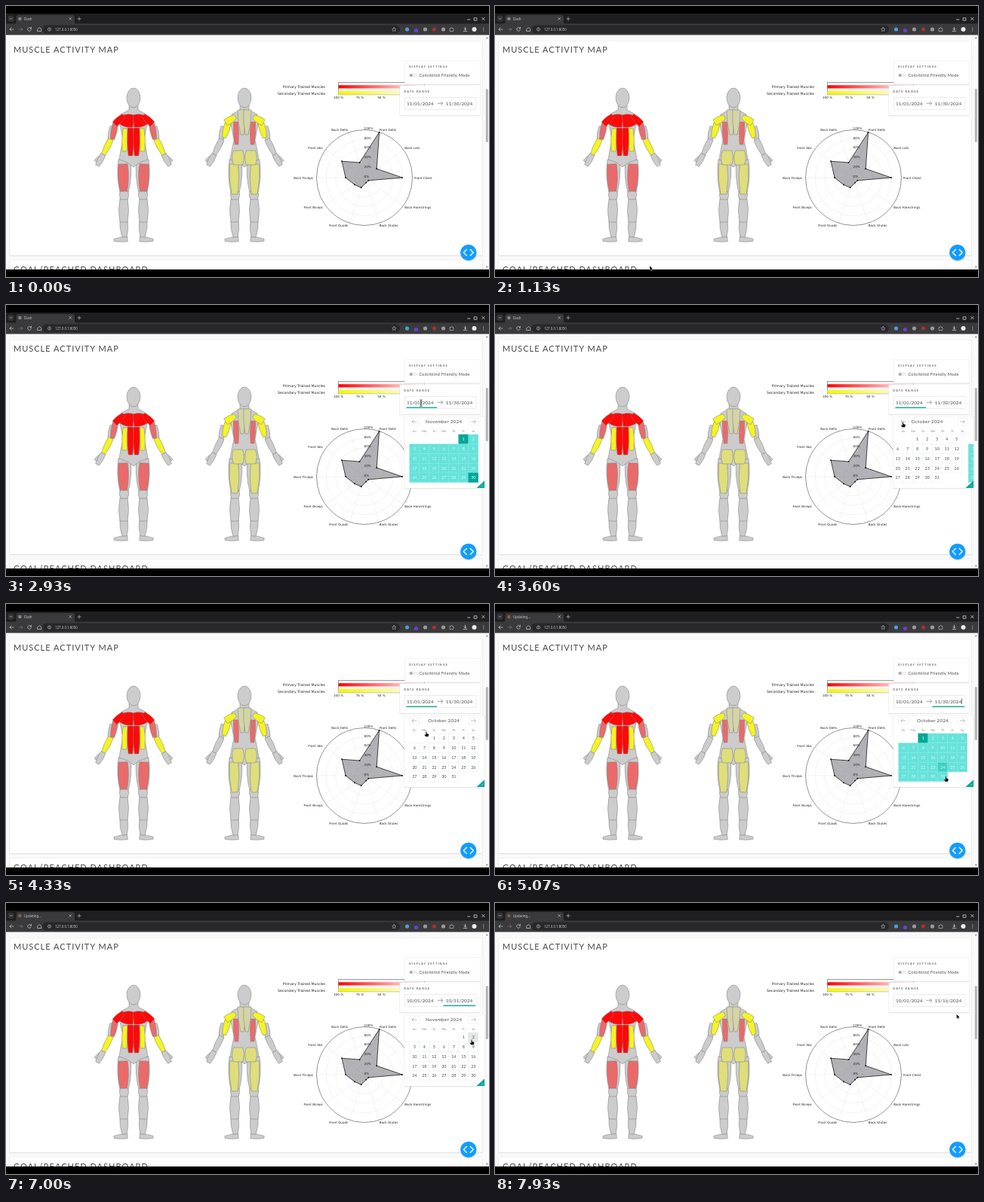
An HTML page for the animation above (8 s loop, 640x360 px).

```html
<!DOCTYPE html>
<html lang="en">
<head>
<meta charset="utf-8">
<title>Muscle Activity Map</title>
<style>
html, body { margin: 0; width: 100%; height: 100%; overflow: hidden; background: #000; }
svg { display: block; width: 100vw; height: 100vh; }
text { font-family: Lato, "Open Sans", sans-serif; fill: #484848; }
.plot { font-family: "DejaVu Sans", sans-serif; fill: #222; font-size: 4.15px; }
.legend { font-size: 4.65px; }
.chrome { font-family: "Noto Sans", sans-serif; fill: #c8c8c8; font-size: 4.4px; }
.title { font-size: 11px; letter-spacing: 1px; }
.label { font-size: 3.9px; font-weight: bold; letter-spacing: 1.08px; fill: #666; }
.date { font-size: 6.4px; }
.month { font-size: 6.2px; letter-spacing: .3px; }
.day { font-size: 5.4px; }
.week { font-size: 4px; fill: #888; }
.mid { text-anchor: middle; }
.end { text-anchor: end; }
.line { fill: none; stroke-linecap: round; stroke-linejoin: round; }
</style>
</head>
<body>
<svg id="stage" viewBox="0 0 640 360"></svg>
<script>
const NS = 'http://www.w3.org/2000/svg';
const LOOP = 8000;
const stage = document.getElementById('stage');

function add(parent, tag, attrs = {}, text) {
  const el = document.createElementNS(NS, tag);
  for (const k in attrs) el.setAttribute(k, attrs[k]);
  if (text !== undefined) el.textContent = text;
  parent.appendChild(el);
  return el;
}
const rect = (p, x, y, width, height, fill, more = {}) => add(p, 'rect', { x, y, width, height, fill, ...more });
const circle = (p, cx, cy, r, fill, more = {}) => add(p, 'circle', { cx, cy, r, fill, ...more });
const label = (p, x, y, cls, text) => add(p, 'text', { x, y, class: cls }, text);
const line = (p, d, stroke, width = 0.7) => add(p, 'path', { d, stroke, 'stroke-width': width, class: 'line' });
const group = (p, attrs = {}) => add(p, 'g', attrs);
const show = (el, on) => el.setAttribute('display', on ? 'inline' : 'none');

const GREY = '#cccccc', RED = '#ff0808', SALMON = '#ea6a6a', YELLOW = '#f4f424', PALE = '#dede7c';
const TEAL = '#00a699', SPAN = '#66e2da', HOVER = '#40cfc4';

const defs = add(stage, 'defs');
function gradient(id, from) {
  const g = add(defs, 'linearGradient', { id });
  add(g, 'stop', { offset: 0, 'stop-color': from });
  add(g, 'stop', { offset: 1, 'stop-color': '#fff' });
}
gradient('reds', '#f00');
gradient('yellows', '#f6f600');
rect(add(defs, 'clipPath', { id: 'calClip' }), 528, 148, 106, 95, '#000');

// Page and cards
rect(stage, 0, 0, 640, 360, '#000');
rect(stage, 0, 38, 640, 312, '#f9f9fa');
function card(p, x, y, w, h) {
  rect(p, x - 0.6, y - 0.3, w + 1.2, h + 1.7, '#dedede', { opacity: 0.7 });
  rect(p, x, y, w, h, '#fff');
}
card(stage, 5, 47, 626, 284);
card(stage, 5, 338, 626, 30);
label(stage, 10, 62.3, 'title', 'MUSCLE ACTIVITY MAP');
label(stage, 10, 354.3, 'title', 'GOAL/REACHED DASHBOARD');

// Scroll bar
rect(stage, 634.5, 39, 5.5, 311, '#fafafa');
rect(stage, 635.8, 110, 3, 71, '#b4b4b4', { rx: 1.5 });
add(stage, 'path', { d: 'M635.8 43.2l1.5-2 1.5 2zM635.8 345.8l1.5 2 1.5-2z', fill: '#777' });

// A bulging band between two points, with a half width at each end
function muscle(p, fill, x1, y1, x2, y2, w1, w2) {
  const len = Math.hypot(x2 - x1, y2 - y1);
  const nx = (y1 - y2) / len, ny = (x2 - x1) / len, bulge = 0.8 * (w1 + w2);
  const at = (x, y, w) => `${x + nx * w} ${y + ny * w}`;
  const mx = (x1 + x2) / 2, my = (y1 + y2) / 2;
  add(p, 'path', { fill, d: `M${at(x1, y1, w1)}Q${at(mx, my, bulge)} ${at(x2, y2, w2)}L${at(x2, y2, -w2)}Q${at(mx, my, -bulge)} ${at(x1, y1, -w1)}Z` });
}

// Half a body, drawn twice as mirror images
function body(cx, paint) {
  for (const side of [-1, 1]) {
    const g = group(stage, { transform: `translate(${cx} 0) scale(${side} 1)`, stroke: '#808080', 'stroke-width': 0.55, 'stroke-linejoin': 'round' });
    const part = (...args) => muscle(g, ...args);
    part(GREY, 42, 199, 51, 206, 2, 1.5);
    part(GREY, 40, 197, 48, 212, 3.3, 2.6);
    part(GREY, 28, 160, 31, 178, 3, 3);
    part(GREY, 8, 309.5, 26, 311, 3.3, 1.5);
    part(GREY, 13, 285, 12, 307, 5, 3);
    part(GREY, 13, 256, 13, 287, 5, 5);
    part(GREY, 12, 204, 12.5, 248, 8, 5.5);
    part(GREY, 12.5, 246, 12.5, 257, 5, 4.5);
    add(g, 'path', { fill: GREY, d: 'M0 130L6 131 6 138 17 144 18 157 14 178 17 192 19 204 8 208 0 214' });
    paint(part);
    add(g, 'path', { fill: GREY, d: 'M0 109A9 13 0 0 1 0 135' });
  }
}
body(169, part => {
  part(YELLOW, 30, 177, 40, 197, 3.4, 2.6);
  part(SALMON, 24, 156, 28, 177, 3.5, 2.5);
  part(YELLOW, 11, 163, 12, 193, 3, 3);
  part(RED, 4, 162, 4, 199, 3.8, 2.8);
  part(RED, 0, 153, 18.5, 151.5, 8, 5);
  part(RED, 13, 145.5, 25, 157, 2.6, 4);
  part(SALMON, 14, 210, 13, 246, 6, 4.5);
});
body(316, part => {
  part(GREY, 30, 177, 40, 197, 3.4, 2.6);
  part('#d4d4a8', 4, 138, 3, 171, 5, 2);
  part(YELLOW, 22, 156, 27, 175, 4, 2.5);
  part(YELLOW, 12, 147, 25, 155, 2.6, 4.4);
  part(SALMON, 11.5, 154, 10.5, 184, 3, 2.4);
  part(PALE, 14, 210, 13, 250, 5.6, 4);
  part(PALE, 8.5, 192, 8.5, 211, 6, 6);
});

// Legend
label(stage, 423, 108.6, 'plot legend end', 'Primary Trained Muscles');
label(stage, 423, 118, 'plot legend end', 'Secondary Trained Muscles');
rect(stage, 440.5, 101.5, 114, 16.3, '#f4f4f4', { stroke: '#777', 'stroke-width': 0.7 });
rect(stage, 440.5, 105.2, 114, 4.2, 'url(#reds)');
rect(stage, 440.5, 113, 114, 4.6, 'url(#yellows)');
for (let i = 0; i < 3; i++) label(stage, 440.5 + 28.5 * i, 122.8, 'plot mid', 100 - 25 * i + ' %');

// Radar chart
const CX = 475, CY = 228, R = 63.5;
const polar = (r, deg) => {
  const a = deg * Math.PI / 180;
  return [CX + r * Math.cos(a), CY - r * Math.sin(a)];
};
const load = {
  'Front Chest': 50, 'Back Lats': 20, 'Front Delts': 63.3, 'Back Delts': 21, 'Front Abs': 37,
  'Back Triceps': 25, 'Front Biceps': 16, 'Front Quads': 14, 'Back Glutes': 7, 'Back Hamstrings': 6.5,
};
for (let k = 1; k < 5; k++) circle(stage, CX, CY, R * k / 5, 'none', { stroke: '#e6e6ea', 'stroke-width': 0.5 });
Object.keys(load).forEach((name, i) => {
  const [x, y] = polar(R, 36 * i), [tx, ty] = polar(67, 36 * i);
  line(stage, `M${CX} ${CY}L${x} ${y}`, '#e6e6ea', 0.5);
  label(stage, tx - 1, ty + 1.5, 'plot' + (tx < CX ? ' end' : ''), name);
});
circle(stage, CX, CY, R, 'none', { stroke: '#666', 'stroke-width': 0.7 });
const spots = Object.values(load).map((r, i) => polar(r, 36 * i));
add(stage, 'polygon', { points: spots.join(' '), fill: '#666670', 'fill-opacity': 0.5, stroke: '#333', 'stroke-width': 0.9 });
spots.forEach(([x, y]) => circle(stage, x, y, 0.95, '#111'));
for (let k = 0; k <= 5; k++) label(stage, 474.5, CY - 0.5 - 12.7 * k, 'plot', 20 * k + '%');

// Settings panel
card(stage, 528.5, 72.5, 99.5, 31);
label(stage, 534, 81.6, 'label', 'DISPLAY SETTINGS');
rect(stage, 534, 89.6, 11, 5, '#f0f0f0', { rx: 2.5 });
circle(stage, 536.7, 92.1, 2, '#aaa');
add(stage, 'text', { x: 547.5, y: 94, class: 'day', 'letter-spacing': 0.3 }, 'Colorblind Friendly Mode');

// Date range panel
card(stage, 522, 106, 106, 39);
label(stage, 527.3, 115.4, 'label', 'DATE RANGE');
rect(stage, 528.5, 121.5, 94.5, 15.8, '#fff', { stroke: '#e2e2e2', 'stroke-width': 0.6 });
const startText = label(stage, 531, 131.6, 'date', '');
const endText = label(stage, 582.7, 131.6, 'date', '');
line(stage, 'M572 129.3h6.6m-2.2-2.2l2.2 2.2l-2.2 2.2', '#666', 0.6);
const startLine = rect(stage, 530.5, 135.6, 40.5, 1.3, TEAL);
const endLine = rect(stage, 579.5, 135.6, 42.5, 1.3, TEAL);
const caret = rect(stage, 618, 125.5, 0.6, 7.6, '#222');

// Calendar: days are counted from October 1
const picker = group(stage);
card(picker, 528, 148.5, 106, 94.5);
const sheet = group(picker, { 'clip-path': 'url(#calClip)' });
const COL = 13, ROW = 12.75;
const cells = [];
function month(name, shift, first, count) {
  const g = group(sheet);
  label(g, 580.2, 157.3, 'month mid', name);
  for (let d = 1; d <= count; d++) {
    const slot = first + d - 1;
    const x = 534.8 + COL * (slot % 7), y = 172 + ROW * Math.floor(slot / 7);
    const box = rect(g, x, y, COL, ROW, 'none', { 'stroke-width': 0.4 });
    const num = label(g, x + COL / 2, y + 8.4, 'day mid', d);
    cells.push({ n: d + shift, x, y, box, num, nov: shift > 0 });
  }
  return g;
}
const oct = month('October 2024', 0, 2, 31);
const nov = month('November 2024', 31, 5, 30);
['Su', 'Mo', 'Tu', 'We', 'Th', 'Fr', 'Sa'].forEach((s, i) => label(picker, 541.3 + COL * i, 169.3, 'week mid', s));
for (const x of [541, 619.5]) rect(picker, x - 6.5, 150.3, 13, 9.5, '#fff', { stroke: '#e6e6e6', 'stroke-width': 0.5, rx: 1 });
line(picker, 'M544 155h-6m2-2l-2 2l2 2M616.5 155h6m-2-2l2 2l-2 2', '#999', 0.6);
add(picker, 'path', { d: 'M634 233.5V243H623.5Z', fill: TEAL });
add(picker, 'text', { x: 630, y: 242, 'font-size': 4, style: 'fill:#fff' }, '?');

// Debug button
circle(stage, 613, 328.4, 11, '#d0d0d0', { opacity: 0.6 });
circle(stage, 612.8, 327.6, 10.6, '#119dff');
line(stage, 'M610.3 323.6l-4 4l4 4M615.3 323.6l4 4l-4 4', '#fff', 1.4);

// Browser frame
rect(stage, 0, 10, 640, 14, '#1e1e20');
rect(stage, 0, 23.5, 640, 15, '#3a3a3c');
add(stage, 'path', { d: 'M11 24Q13.5 24 13.5 21V15Q13.5 12 16.5 12H88Q91 12 91 15V21Q91 24 93.5 24Z', fill: '#3a3a3c' });
rect(stage, 2.5, 12.8, 8, 8, '#343436', { rx: 2.2 });
rect(stage, 48, 25.5, 474, 11, '#28282a', { rx: 5.5 });
line(stage, 'M5.2 16.2l1.4 1.4l1.4-1.4M83.7 15.4l3 3m0-3l-3 3M97 14.8v4.4m-2.2-2.2h4.4', '#d2d2d2', 0.6);
line(stage, 'M611.5 18h3.5M620.5 15.8h3.4v3.4h-3.4zM630.7 15.3l3.4 3.4m0-3.4l-3.4 3.4', '#e6e6e6', 0.7);
line(stage, 'M10 31H5m2.2-2.2L5 31l2.2 2.2', '#ccc');
line(stage, 'M17 31h5m-2.2-2.2L22 31l-2.2 2.2', '#777');
line(stage, 'M33.3 29.8a2.4 2.4 0 1 0 .1 2M33.5 28.2v1.8h-1.8M42 30.6l2.4-2l2.4 2v2.9h-4.8z', '#ccc');
circle(stage, 57.5, 31, 2.1, 'none', { stroke: '#ccc', 'stroke-width': 0.6 });
line(stage, 'M57.5 30.8v1.1M57.5 29.8v.1', '#ccc', 0.6);
label(stage, 65, 32.6, 'chrome', '127.0.0.1:8050');
line(stage, 'M514.3 28.4l.8 1.8 1.9.2-1.4 1.3.4 1.9-1.7-1-1.7 1 .4-1.9-1.4-1.3 1.9-.2z', '#ccc', 0.5);
['#4a9fd8', '#6a3fd4', '#999', '#a8322a', '#999'].forEach((c, i) => circle(stage, 531.5 + 12 * i, i === 1 ? 32.5 : 31, 2.6, c));
line(stage, 'M588.5 29.6h1.2a.9.9 0 0 1 1.8 0h1.2v1.3a.9.9 0 0 1 0 1.7v1h-4.2z', '#ccc', 0.6);
line(stage, 'M608.5 28.2v3.6m-1.6-1.6l1.6 1.6l1.6-1.6M606.2 33.4h4.6', '#e0e0e0');
circle(stage, 620.5, 31, 3, '#ececec');
for (const y of [29, 31, 33]) circle(stage, 632.8, y, 0.55, '#e0e0e0');
const icon = circle(stage, 18.4, 17, 2.2, '#888');
const tabText = label(stage, 24, 18.6, 'chrome', '');
rect(stage, 0, 350, 640, 10, '#000');

// Pointers, hot spot at 0,0
const pointers = {
  arrow: add(stage, 'path', { d: 'M0 0V6.2L1.5 4.9 2.5 7 3.5 6.5 2.6 4.5H4.5Z', fill: '#000', stroke: '#fff', 'stroke-width': 0.4 }),
  hand: add(stage, 'path', { d: 'M-.7 .3Q0-.5 .7 .3V2.6L3 3.1Q3.6 3.4 3.4 4.4L2.7 7H-.8L-2.6 4.5Q-2.4 3.5-1.6 3.9L-.7 4.6Z', fill: '#000', stroke: '#fff', 'stroke-width': 0.35 }),
  beam: line(stage, 'M-1.2-4.4Q0-4.4 0-3.4V3.4Q0 4.4-1.2 4.4M1.2-4.4Q0-4.4 0-3.4V3.4Q0 4.4 1.2 4.4', '#222', 0.7),
};

// Clicks, in ms
const OPEN = 2650, PREV = 3440, PICK1 = 4600, PICK2 = 5350, REOPEN = 5930, NEXT = 6580, PICK3 = 7300;
const ENTER = 870, GLIDE = 500, SLIDE = 200, LAG = 90;

// Arrival time and place of the pointer
const stops = [
  [ENTER, 205, 345], [1870, 532, 144.5], [OPEN - 50, 550, 130], [PREV - 40, 540.5, 155.5], [PICK1 - 50, 567, 178],
  [5120, 598, 230], [REOPEN - 30, 602, 130.5], [NEXT - 20, 619, 155], [7000, 617, 181.5], [PICK3 - 60, 618, 205], [7900, 611.5, 147.5],
];
const ease = v => {
  v = Math.max(0, Math.min(1, v));
  return v < 0.5 ? 2 * v * v : 1 - 2 * (1 - v) ** 2;
};
function place(t) {
  let [last, x, y] = stops[0];
  for (const [arrive, px, py] of stops.slice(1)) {
    const leave = Math.max(last, arrive - GLIDE);
    const k = ease((t - leave) / (arrive - leave));
    x += (px - x) * k;
    y += (py - y) * k;
    last = arrive;
  }
  return [x, y];
}
const format = n => (n > 31 ? '11/' : '10/') + String(n > 31 ? n - 31 : n).padStart(2, '0') + '/2024';

function draw(t) {
  const open = (t >= OPEN && t < PICK2) || (t >= REOPEN && t < PICK3);
  const picked = t >= PICK1;
  const from = picked ? 1 : 32;
  const to = t < PICK2 ? 61 : t < PICK3 ? 31 : 47;
  startText.textContent = format(from);
  endText.textContent = format(to);
  show(startLine, open && !picked);
  show(endLine, open && picked);
  show(caret, picked && t < PICK2 && (t - PICK1) % 1000 < 500);
  show(picker, open);

  const view = 1 - ease((t - PREV) / SLIDE) + ease((t - NEXT) / SLIDE);
  oct.setAttribute('transform', `translate(${-100 * view} 0)`);
  nov.setAttribute('transform', `translate(${100 - 100 * view} 0)`);
  const [hx, hy] = place(t - LAG);
  for (const c of cells) {
    const front = view === (c.nov ? 1 : 0);
    const over = front && hx >= c.x && hx < c.x + COL && hy >= c.y && hy < c.y + ROW;
    const edge = c.n === from || c.n === to, inside = c.n > from && c.n < to;
    c.box.setAttribute('fill', edge ? TEAL : inside ? (over ? HOVER : SPAN) : over ? '#e4e7e7' : '#fff');
    c.box.setAttribute('stroke', edge ? TEAL : inside ? '#80e8e0' : '#e8ebeb');
    c.num.style.fill = edge ? '#fff' : inside ? '#d4fbf7' : '#484848';
  }

  tabText.textContent = picked ? 'Updating...' : 'Dash';
  icon.setAttribute('fill', picked ? '#8c5a50' : '#888');

  const [x, y] = place(t);
  const inInput = x > 528 && x < 623 && y > 121.5 && y < 137;
  const kind = inInput ? 'beam' : open && x > 534 && x < 626 && y > 150 && y < 237 ? 'hand' : 'arrow';
  for (const k in pointers) {
    show(pointers[k], t >= ENTER && k === kind);
    pointers[k].setAttribute('transform', `translate(${x} ${y})`);
  }
}

const began = performance.now();
function tick() {
  draw((performance.now() - began) % LOOP);
  requestAnimationFrame(tick);
}
tick();
</script>
</body>
</html>
```
